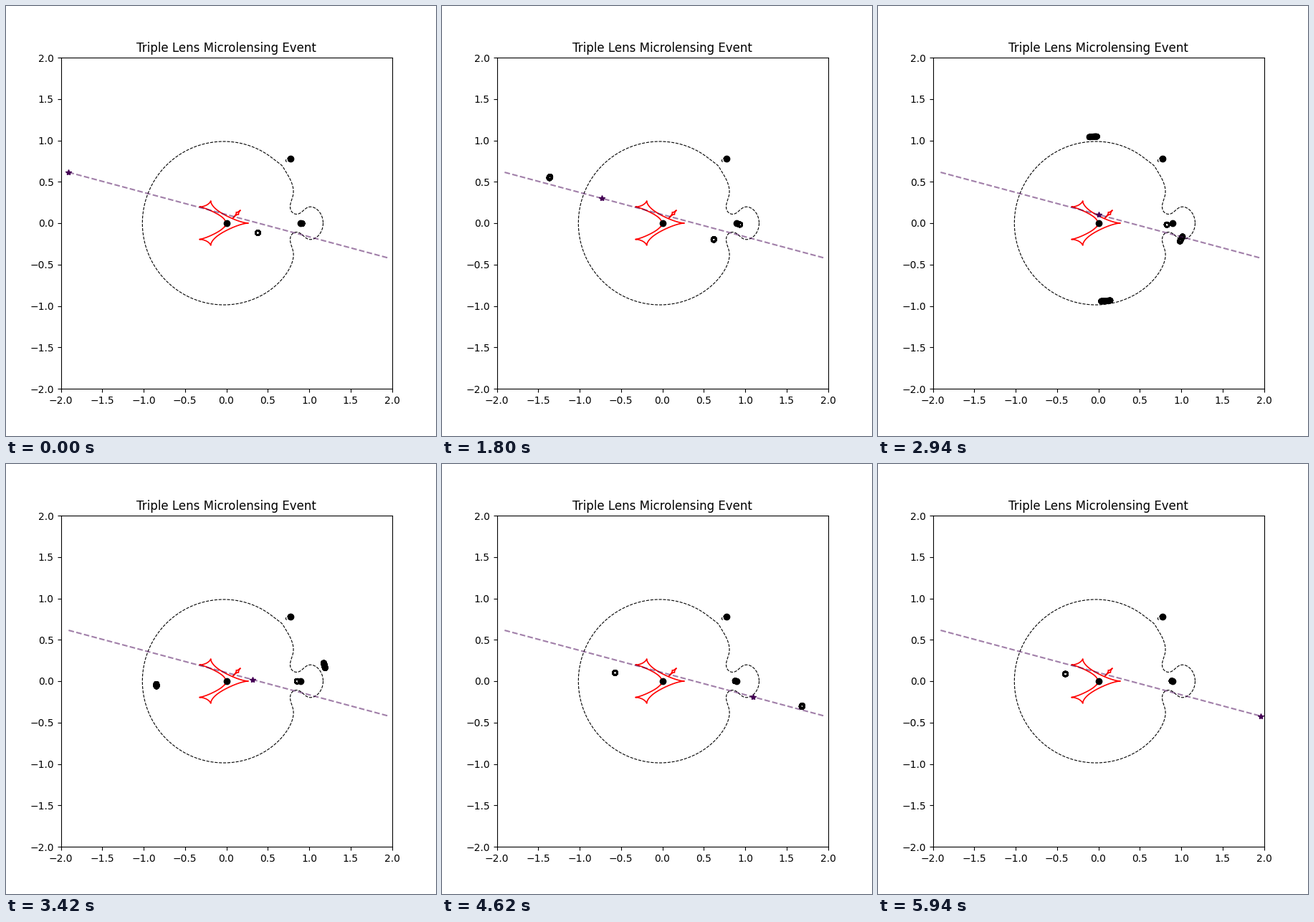
Recreate the animation shown at these times as a matplotlib script. Size 600 px wide and 600 px high, loop 6000 ms.

```python
import numpy as np
import matplotlib.pyplot as plt
from matplotlib.animation import FuncAnimation

FRAMES, INTERVAL = 100, 60
S2, Q2 = 0.9, 0.028
S3, Q3, PSI = 1.1, 3e-4, np.pi / 4
U0, ALPHA, RHO = 0.1, np.radians(15), 0.005
PURPLE = plt.get_cmap("viridis")(0.0)

lenses = np.array([0, S2, S3 * np.exp(1j * PSI)])
masses = np.array([1, Q2, Q3]) / (1 + Q2)
barycentre = S2 * Q2 / (1 + Q2)


def product(polys):
    out = np.array([1 + 0j])
    for p in polys:
        out = np.polymul(out, p)
    return out


def weighted_sum(polys):
    """Sum of each mass times the product of all the other polynomials."""
    total = np.array([0j])
    for i, m in enumerate(masses):
        total = np.polyadd(total, m * product(polys[:i] + polys[i + 1:]))
    return total


FACTORS = [np.array([1, -z]) for z in lenses]
P = product(FACTORS)
Q = weighted_sum(FACTORS)
SQUARES = [np.polymul(f, f) for f in FACTORS]
P2 = product(SQUARES)
Q2_SUM = weighted_sum(SQUARES)


def to_source(z):
    z = np.asarray(z)
    return z - (masses / np.conj(z[..., None] - lenses)).sum(-1)


def find_images(zeta):
    terms = [np.polyadd((np.conj(zeta) - np.conj(z)) * P, Q) for z in lenses]
    poly = np.polysub(np.polymul([1, -zeta], product(terms)),
                      np.polymul(P, weighted_sum(terms)))
    z = np.roots(poly)
    return z[np.abs(to_source(z) - zeta) < 1e-5]


def critical_curves(steps=600):
    """Follow every root of the critical equation, then join them into loops."""
    rows = []
    for phi in np.linspace(0, 2 * np.pi, steps):
        roots = list(np.roots(np.polysub(np.exp(1j * phi) * P2, Q2_SUM)))
        if rows:
            roots = [roots.pop(int(np.argmin(np.abs(np.array(roots) - z))))
                     for z in rows[-1]]
        rows.append(roots)
    branches = np.array(rows).T
    left = set(range(len(branches)))
    curves = []
    while left:
        i = max(left, key=lambda k: branches[k, 0].real)
        loop = []
        while i in left:
            left.remove(i)
            loop.append(branches[i])
            i = int(np.argmin(np.abs(branches[:, 0] - branches[i, -1])))
        curves.append(np.concatenate(loop))
    return curves


tau = np.linspace(-2, 2, FRAMES)
path = (U0 * 1j + tau) * np.exp(-1j * ALPHA)
rim = RHO * np.exp(1j * np.linspace(0, 2 * np.pi, 60, endpoint=False))

fig, ax = plt.subplots(figsize=(6, 6), dpi=100)
ax.set_aspect("equal")
ax.set_xlim(-2, 2)
ax.set_ylim(-2, 2)
ticks = np.arange(-2, 2.1, 0.5)
ax.set_xticks(ticks)
ax.set_yticks(ticks)
ax.set_title("Triple Lens Microlensing Event")

for curve in critical_curves():
    caustic = to_source(curve) - barycentre
    ax.plot(curve.real - barycentre, curve.imag, "k--", lw=0.8)
    ax.plot(caustic.real, caustic.imag, "r-", lw=1.2)
ax.plot(path.real, path.imag, "--", color=PURPLE, alpha=0.5)
ax.plot(lenses.real, lenses.imag, "ko")

images = ax.scatter([], [], s=20, facecolors="none", edgecolors="k",
                    linewidths=1.5)
source, = ax.plot([], [], "*", color=PURPLE)


def update(i):
    z = np.concatenate([find_images(path[i] + r) for r in rim])
    images.set_offsets(np.column_stack([z.real, z.imag]))
    source.set_data([path[i].real], [path[i].imag])
    return images, source


anim = FuncAnimation(fig, update, frames=FRAMES, interval=INTERVAL,
                     init_func=lambda: update(0), repeat=True, repeat_delay=0)
plt.show()
```
